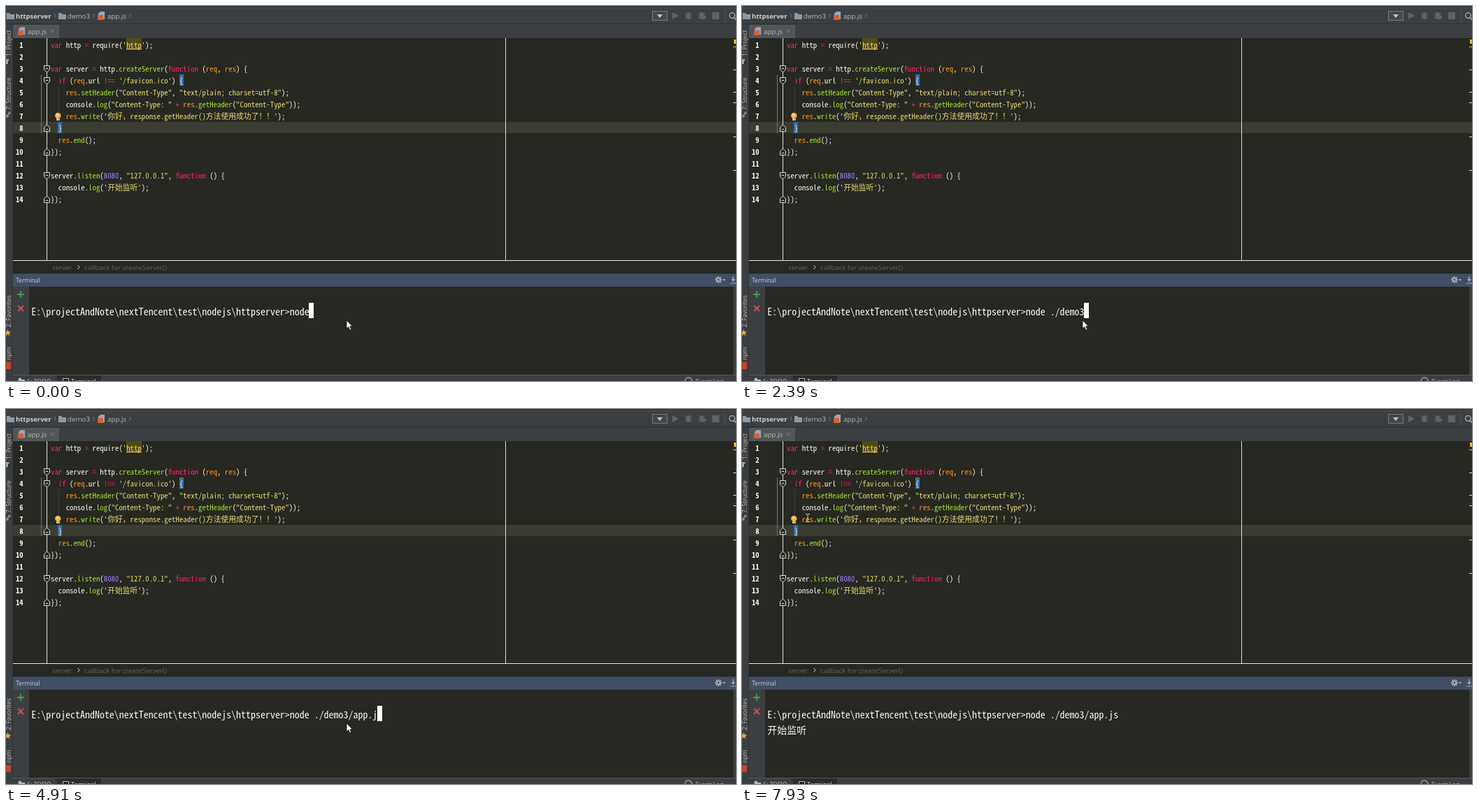
An HTML page with a canvas that plays this animation: 1044 px wide and 537 px high, repeating every 8 s.

```html
<!DOCTYPE html>
<html lang="en">
<head>
<meta charset="utf-8">
<title>Editor and terminal</title>
<style>
html, body { margin: 0; width: 100%; height: 100%; overflow: hidden; background: #272822; }
canvas { display: block; }
</style>
</head>
<body>
<canvas id="stage" width="1044" height="537"></canvas>
<script>
const ctx = document.getElementById('stage').getContext('2d');
const LOOP = 8000;
const UI = '"Open Sans", "Noto Sans", sans-serif';
const MONO = '"Noto Sans Mono CJK SC", "Noto Sans CJK SC", "Noto Sans CJK", monospace';
const C = {
  panel: '#3c3f41', editor: '#272822', text: '#f8f8f2', key: '#f92672', str: '#e6db74',
  num: '#ae81ff', fn: '#a6e22e', arg: '#fd971f', label: '#bbbbbb', dim: '#6b6e70'
};

const CODE = [
  "var http = require('http');",
  "",
  "var server = http.createServer(function (req, res) {",
  "  if (req.url !== '/favicon.ico') {",
  "    res.setHeader(\"Content-Type\", \"text/plain; charset=utf-8\");",
  "    console.log(\"Content-Type: \" + res.getHeader(\"Content-Type\"));",
  "    res.write('你好，response.getHeader()方法使用成功了！！');",
  "  }",
  "  res.end();",
  "});",
  "",
  "server.listen(8080, \"127.0.0.1\", function () {",
  "  console.log('开始监听');",
  "});"
];
const CELL = 5.41, CODE_X = 64, LINE = 17;
const rowY = n => 56 + (n - 1) * LINE;

const PROMPT = 'E:\\projectAndNote\\nextTencent\\test\\nodejs\\httpserver>';
const COMMAND = 'node ./demo3/app.js';
const TERM_CELL = 6.972, TERM_X = 36.3, TERM_LINE = 22.3;

// [time, characters of the command shown]
const TYPING = [[0, 4], [160, 5], [710, 6], [840, 7], [990, 9], [1140, 10], [1420, 11], [2390, 12],
  [3230, 13], [3960, 14], [4240, 15], [4510, 16], [4660, 17], [4910, 18], [5050, 19]];
const ENTER = 5480, REPLY = 5600;
const CARET_OFF = [[1830, 2390], [3840, 3960], [6580, 7140], [7530, 8000]];
// [time, x, y]
const MOUSE = [[0, 487, 450], [6150, 462, 404], [6280, 422, 335], [6440, 262, 259], [6580, 276, 255],
  [6990, 410, 185], [7140, 893, 84], [7260, 500, 130], [7380, 130, 162], [7530, 125, 154],
  [7680, 113, 145], [7930, 94, 156]];

function rect(x, y, w, h, color) {
  ctx.fillStyle = color;
  ctx.fillRect(x, y, w, h);
}

function poly(points, fill, stroke, width = 1) {
  ctx.beginPath();
  points.forEach(([x, y], i) => i ? ctx.lineTo(x, y) : ctx.moveTo(x, y));
  ctx.closePath();
  if (fill) { ctx.fillStyle = fill; ctx.fill(); }
  if (stroke) { ctx.strokeStyle = stroke; ctx.lineWidth = width; ctx.stroke(); }
}

function line(x1, y1, x2, y2, color, width = 1) {
  ctx.strokeStyle = color;
  ctx.lineWidth = width;
  ctx.beginPath();
  ctx.moveTo(x1, y1);
  ctx.lineTo(x2, y2);
  ctx.stroke();
}

function circle(x, y, r, fill, stroke) {
  ctx.beginPath();
  ctx.arc(x, y, r, 0, 7);
  if (fill) { ctx.fillStyle = fill; ctx.fill(); }
  if (stroke) { ctx.strokeStyle = stroke; ctx.lineWidth = 1.3; ctx.stroke(); }
}

function label(str, x, y, size = 9.8, color = C.label, weight = 400) {
  ctx.font = `${weight} ${size}px ${UI}`;
  ctx.fillStyle = color;
  ctx.fillText(str, x, y);
}

function sideLabel(str, bottom) {
  ctx.save();
  ctx.translate(6.5, bottom);
  ctx.rotate(-Math.PI / 2);
  label(str, 0, 0, 8.6);
  ctx.restore();
}

// Draws on a character grid; CJK takes two cells. Returns the next x.
function mono(str, x, y, cell, color) {
  ctx.font = `${cell * 2}px ${MONO}`;
  ctx.fillStyle = color;
  for (const ch of str) {
    ctx.fillText(ch, x, y);
    x += ch > '\u2e7f' ? cell * 2 : cell;
  }
  return x;
}

const TOKEN = /('[^']*'|"[^"]*")|\b(var|function|if)\b|(!==|=|\+)|(\d+)|(\w+)|([^\w'"=+!]+)/g;

function codeLine(src, y) {
  let x = CODE_X;
  for (const m of src.matchAll(TOKEN)) {
    const word = m[5];
    const call = word && src[m.index - 1] === '.' && src[m.index + word.length] === '(';
    const color = m[1] ? C.str : m[2] || m[3] ? C.key : m[4] ? C.num
      : call ? C.fn : /^re[qs]$/.test(word) ? C.arg : C.text;
    x = mono(m[0], x, y, CELL, color);
  }
}

function folder(x, y) {
  rect(x, y, 5, 2, '#8a9ba8');
  rect(x, y + 2, 11, 7, '#8a9ba8');
}

function fileIcon(x, y) {
  poly([[x + 4, y], [x + 10, y], [x + 10, y + 11], [x + 1, y + 11], [x + 1, y + 3]], '#9aa7b0');
  rect(x, y + 5, 8, 7, '#d0613a');
}

function chevron(x, y, color = '#777a7c') {
  line(x, y - 3, x + 2.5, y, color);
  line(x + 2.5, y, x, y + 3, color);
}

function gear(x, y) {
  for (let i = 0; i < 4; i++) {
    const a = i * Math.PI / 4, dx = Math.cos(a) * 5, dy = Math.sin(a) * 5;
    line(x - dx, y - dy, x + dx, y + dy, '#a9adb0', 1.7);
  }
  circle(x, y, 3.3, '#a9adb0');
  circle(x, y, 1.4, '#3f4b60');
}

function bug(x, y) {
  for (const d of [-3, 0, 3]) line(x - 5, y + d * 1.2, x + 5, y + d * 1.2, '#606365');
  ctx.beginPath();
  ctx.ellipse(x, y, 3.3, 4.8, 0, 0, 7);
  ctx.fillStyle = '#606365';
  ctx.fill();
}

function toolbar() {
  rect(0, 0, 1044, 46, C.panel);
  rect(0, 1, 1044, 1, '#2b2d2e');
  rect(0, 2, 1044, 1, '#505355');
  rect(0, 25, 1044, 1, '#2d2f30');

  folder(1, 10);
  label('httpserver', 14, 18, 9.5, '#d0d0d0', 700);
  chevron(69, 14);
  folder(75, 10);
  label('demo3', 88, 18);
  chevron(124, 14);
  fileIcon(131, 8);
  label('app.js', 145, 18);
  chevron(176, 14);

  rect(924, 7, 22, 14, '#77797b');
  rect(925, 8, 20, 12, '#45484a');
  poly([[931, 12], [939, 12], [935, 17]], '#c5c5c5');
  poly([[953, 9], [962, 14], [953, 19]], '#606365');
  bug(976, 14);
  bug(995, 14);
  poly([[996, 12], [1002, 16], [996, 20]], '#606365');
  rect(1010, 9, 10, 10, '#606365');
  rect(1028, 6, 1, 16, '#515456');
  circle(1038.5, 13.5, 3.8, null, '#b0b0b0');
  line(1041, 16.5, 1044, 19.5, '#b0b0b0', 1.6);

  rect(10, 27, 66, 19, '#515658');
  fileIcon(17, 30);
  label('app.js', 31, 40);
  line(64, 33.5, 69, 38.5, '#808385');
  line(69, 33.5, 64, 38.5, '#808385');
}

function sidebar() {
  rect(0, 26, 10, 511, C.panel);
  rect(9, 26, 1, 502, '#313335');
  sideLabel('1: Project', 72);
  rect(0, 76, 4, 7, '#9aa7b0');
  rect(3, 79, 3, 4, '#26282a');
  sideLabel('7: Structure', 149);
  line(0, 159, 5, 153, '#9aa7b0', 1.4);
  circle(5, 153, 1.8, '#c66a5b');
  circle(2, 158, 1.8, '#6c93b8');
  sideLabel('2: Favorites', 460);
  const star = Array.from({ length: 10 }, (_, i) => {
    const a = -Math.PI / 2 + i * Math.PI / 5, r = i % 2 ? 2.2 : 5;
    return [2.5 + r * Math.cos(a), 468 + r * Math.sin(a)];
  });
  poly(star, '#e3a24a');
  sideLabel('npm', 507);
  rect(0, 510, 7, 10, '#c2452d');
}

function fold(row, down) {
  const y = rowY(row), s = down ? 1 : -1;
  poly([[54.5, y - 4.5 * s], [62.5, y - 4.5 * s], [62.5, y + 1 * s], [58.5, y + 5 * s], [54.5, y + 1 * s]],
    C.editor, '#d8d8d4');
  line(56.5, y - s + 0.5, 60.5, y - s + 0.5, '#d8d8d4');
}

function editor() {
  rect(10, 46, 1034, 337, C.editor);
  rect(10, 166, 1034, 16, '#3c3d32');
  rect(50, 98, 1, 84, '#3f80c0');
  rect(58, 46, 1, 318, '#e0e0dc');
  rect(714, 46, 1, 318, '#e0e0dc');
  rect(10, 364, 1034, 1, '#e8e8e4');
  rect(75, 115, 1, 36, '#43443d');

  rect(172, 46, 22, 17, '#524a14');
  rect(248, 98, 6, 16, '#3b6ea5');
  rect(74, 166, 6, 16, '#3b6ea5');

  CODE.forEach((src, i) => {
    const y = rowY(i + 1) + 3.5;
    codeLine(src, y);
    ctx.font = `700 10.6px ${MONO}`;
    ctx.fillStyle = C.text;
    ctx.textAlign = 'right';
    ctx.fillText(i + 1, 24.5, y);
    ctx.textAlign = 'left';
  });
  rect(172, 61, 22, 1, C.str);

  for (const row of [3, 4, 12]) fold(row, true);
  for (const row of [8, 10, 14]) fold(row, false);

  circle(74.3, 157, 4.2, '#f2b04c');
  circle(73.5, 156, 1.8, '#ffd792');
  rect(72, 161, 5, 3, '#b9b9b4');

  rect(1041, 48, 3, 6, '#e6c21e');
  for (const y of [58, 91, 123, 138, 187, 235]) rect(1040, y, 4, 1, y < 60 ? '#e6c21e' : '#d8d8d4');

  label('server', 66, 377.5, 9.8, '#62635d');
  chevron(102.5, 374, '#c8c8c4');
  label('callback for createServer()', 112, 377.5, 9.8, '#62635d');
}

function terminalFrame() {
  rect(10, 383, 1034, 19, '#414e65');
  rect(10, 383, 1034, 1, '#35405a');
  label('Terminal', 14, 396, 8.5, '#d0d0d0');
  gear(1019, 392);
  poly([[1025, 391], [1029, 391], [1027, 394]], '#a9adb0');
  line(1040, 387, 1040, 394, '#a9adb0', 1.4);
  poly([[1037, 391], [1043, 391], [1040, 395]], '#a9adb0');
  line(1036, 397, 1044, 397, '#a9adb0');

  rect(10, 402, 1034, 126, C.editor);
  rect(10, 402, 23, 126, C.panel);
  rect(1040, 402, 4, 126, C.panel);
  line(16, 413, 26, 413, '#3fa652', 1.8);
  line(21, 408, 21, 418, '#3fa652', 1.8);
  line(17, 429, 25, 437, '#c75450', 1.9);
  line(25, 429, 17, 437, '#c75450', 1.9);

  rect(0, 528, 1044, 9, C.panel);
  rect(10, 528, 1034, 1, '#55585a');
  rect(73, 529, 63, 8, '#2a2c2d');
  circle(20, 535, 2.5, '#b9b9b9');
  rect(20, 535, 7, 2, '#b9b9b9');
  label('6: TODO', 30, 541, 8.8);
  rect(81, 533, 9, 4, '#b9b9b9');
  rect(82, 534, 7, 3, '#1d1f20');
  label('Terminal', 93, 541, 8.8, '#d8d8d8');
  circle(976, 537, 5, null, '#9a9da0');
  label('Event Log', 986, 541, 8.8);
}

const latest = (steps, t) => steps.filter(s => s[0] <= t).pop();

function terminal(t) {
  const typed = COMMAND.slice(0, latest(TYPING, t)[1]);
  let x = mono(PROMPT + typed, TERM_X, 442.5, TERM_CELL, C.text);
  let row = 0;
  if (t >= ENTER) { x = TERM_X; row = 1; }
  if (t >= REPLY) {
    mono('开始监听', TERM_X, 465, TERM_CELL, C.text);
    row = 2;
  }
  if (!CARET_OFF.some(([a, b]) => t >= a && t < b)) {
    rect(Math.round(x - 0.4), Math.round(425 + row * TERM_LINE), 7, 22, '#ffffff');
  }
}

function mouse(t) {
  const [, x, y] = latest(MOUSE, t);
  if (y >= 383) {
    const shape = [[0, 0], [0, 12], [2.8, 9.6], [4.8, 14], [6.8, 13.1], [4.9, 8.8], [8.3, 8.6]];
    poly(shape.map(([dx, dy]) => [x + dx, y + dy]), '#ffffff', '#111111', 0.8);
    return;
  }
  const color = '#d6d6d2';
  rect(x - 0.5, y - 5, 1, 10, color);
  for (const edge of [-6, 5]) {
    rect(x - 3, y + edge, 2.5, 1, color);
    rect(x + 0.5, y + edge, 2.5, 1, color);
  }
}

function draw(now) {
  const t = now % LOOP;
  toolbar();
  editor();
  sidebar();
  terminalFrame();
  terminal(t);
  mouse(t);
}

let start;
function tick(now) {
  start ??= now;
  draw(now - start);
  requestAnimationFrame(tick);
}
requestAnimationFrame(tick);
</script>
</body>
</html>
```
